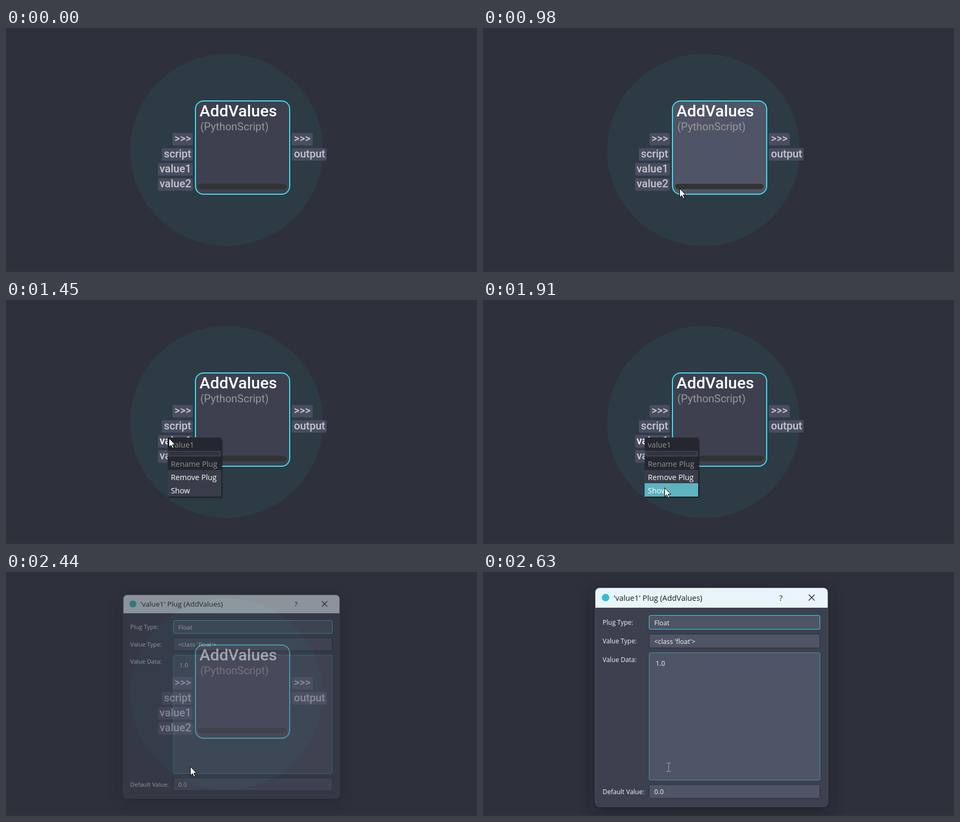
Recreate the animation shown at these times as an HTML page. Size 880 by 458 pixels, loop 3.9 s.

```html
<!DOCTYPE html>
<html lang="en">
<head>
<meta charset="utf-8">
<title>Plug menu</title>
<style>
  html, body { margin: 0; width: 100%; height: 100%; overflow: hidden; background: #2e313c; }
  svg { display: block; width: 100vw; height: 100vh; }
  .node text { font-family: Roboto, sans-serif; font-size: 20px; }
  .plug rect { fill: #4a4d60; }
  .plug text { fill: #c6c7cc; font-weight: 500; }
  .plug.lit rect { fill: #595e75; }
  .plug.lit text, .plug.open text { fill: #fff; }
  .menu text { font: 14.2px "Open Sans", "Noto Sans", sans-serif; fill: #fff; }
  .menu .off { fill: #929295; }
  .dialog text { font: 12px "Open Sans", "Noto Sans", sans-serif; fill: #f4f5f7; }
  .dialog .value { font-size: 12.4px; }
  .dialog .title { font-size: 14.4px; fill: #1b1b1d; }
  .field { fill: #4f5466; stroke: #2a2c35; }
</style>
</head>
<body>
<svg viewBox="0 0 880 458" preserveAspectRatio="none">
  <defs>
    <linearGradient id="bar"><stop offset="0" stop-color="#e8f5fb"/><stop offset=".4" stop-color="#e8f5f6"/><stop offset="1" stop-color="#eaf4fd"/></linearGradient>
    <filter id="soft" x="-20%" y="-20%" width="140%" height="140%"><feGaussianBlur stdDeviation="14"/></filter>
    <filter id="tight"><feGaussianBlur stdDeviation="1"/></filter>
  </defs>
  <rect width="880" height="458" fill="#2e313c"/>
  <circle cx="412" cy="229" r="180" fill="#2d3b45"/>
  <rect y="457" width="880" height="1" fill="#36343e"/>

  <g class="node">
    <rect id="body" x="354" y="137" width="176" height="175" rx="15" stroke="#3be3f0" stroke-width="2"/>
    <rect x="359" y="292.5" width="165" height="10" rx="5" fill="#333"/>
    <text x="361.5" y="166" fill="#fff" style="font-size:30px;font-weight:500">AddValues</text>
    <text x="363" y="192" fill="#989898">(PythonScript)</text>
    <g id="plugs"></g>
  </g>

  <g class="menu" id="menu">
    <rect x="304" y="262" width="100" height="109" fill="#15161b" opacity=".8" filter="url(#tight)"/>
    <rect x="302" y="258" width="100" height="111" fill="#393d4a"/>
    <rect x="302" y="258" width="100" height="25" fill="#25272f"/>
    <rect x="306" y="286" width="92" height="1" fill="#22242b"/>
    <rect x="306" y="289" width="92" height="1" fill="#22242b"/>
    <rect x="302" y="294" width="100" height="25" fill="#25272f"/>
    <rect id="pick" x="302" width="100" height="25" fill="#5fb4bf"/>
    <text class="off" x="308" y="277">value1</text>
    <text class="off" x="308" y="313">Rename Plug</text>
    <text x="308" y="338">Remove Plug</text>
    <text x="308" y="363">Show</text>
  </g>

  <g class="dialog" id="dialog">
    <rect x="208" y="38" width="438" height="412" rx="10" fill="#14151a" opacity=".55" filter="url(#soft)"/>
    <rect x="209.5" y="29.5" width="435" height="411" rx="8" fill="#3d404f" stroke="#4a4d59"/>
    <path d="M210 67V38a8 8 0 0 1 8-8H636a8 8 0 0 1 8 8V67Z" fill="url(#bar)"/>
    <circle cx="229" cy="48" r="7" fill="#31bfd0"/>
    <text class="title" x="244" y="53.5">'value1' Plug (AddValues)</text>
    <text class="title" x="553.5" y="53.5">?</text>
    <path d="M608.5 42.5l11 11m0-11l-11 11" stroke="#1b1b1d" stroke-width="1.3"/>
    <g id="fields"></g>
  </g>

  <path id="arrow" d="M.5.5V17L4.4 13.4 7 19.3 9.6 18.2 7 12.5H12Z" fill="#fff" stroke="#000"/>
  <path id="beam" d="M343 358.500h3l1 1 1-1h3M347 359v15M343 374.500h3l1-1 1 1h3" fill="none" stroke="#b3aaa0"/>
</svg>
<script>
const $ = id => document.getElementById(id);
const NS = "http://www.w3.org/2000/svg";
const LOOP = 3900;

function add(parent, tag, attrs, text) {
  const el = document.createElementNS(NS, tag);
  for (const k in attrs) el.setAttribute(k, attrs[k]);
  if (text) el.textContent = text;
  return parent.appendChild(el);
}

// label, left, top, width, right aligned
const plugs = [
  [">>>", 311, 197, 38, true], ["script", 291, 225.5, 58, true],
  ["value1", 284, 253.5, 65, true], ["value2", 284, 282, 65, true],
  [">>>", 534, 197, 39, false], ["output", 534, 225.5, 65, false]
].map(([label, x, y, width, right]) => {
  const g = add($("plugs"), "g", { class: "plug" });
  add(g, "rect", { x, y, width, height: 23.5, rx: 3 });
  add(g, "text", { x: right ? x + width - 3 : x + 4, y: y + 17,
    "text-anchor": right ? "end" : "start" }, label);
  return g;
});

// label, value, top, height, border
[
  ["Plug Type:", "Float", 81.5, 26, "#30dce9"],
  ["Value Type:", "<class 'float'>", 116.5, 26],
  ["Value Data:", "1.0", 151.5, 239, "#3f9ba5"],
  ["Default Value:", "0.0", 399, 26]
].forEach(([label, value, y, height, border]) => {
  const g = $("fields"), tall = height > 30;
  const box = add(g, "rect", { class: "field", x: 310.5, y, width: 319, height, rx: 2.5 });
  if (border) box.style.stroke = border;
  add(g, "text", { x: 223.5, y: y + 17.5 }, label);
  add(g, "text", { class: "value", x: tall ? 322.5 : 320, y: y + (tall ? 24.5 : 18) }, value);
});

// time, x, y
const path = [
  [660, 788, 444], [720, 722, 422], [790, 622, 388], [850, 512, 351], [920, 422, 320],
  [980, 367, 301], [1050, 324, 270], [1110, 298, 251], [1180, 290, 245], [1310, 305, 254],
  [1450, 304, 259], [1640, 306, 266], [1700, 311, 282], [1770, 319, 305], [1840, 329, 330],
  [1900, 339, 352], [1970, 344, 364], [2300, 344, 365]
];
// time, scale, opacity
const opening = [[2440, .93, .5], [2500, .976, .98], [2570, .994, 1], [2630, 1, 1]];

const at = (table, t) => table.filter(row => row[0] <= t).pop();
const show = (el, on) => el.setAttribute("visibility", on ? "visible" : "hidden");

function draw(t) {
  const spot = at(path, t), grow = at(opening, t);
  const menuOn = t >= 1450 && t < 2440;

  $("body").setAttribute("fill", t >= 980 && t < 1450 ? "#4f5466" : "#3d404f");
  plugs[2].classList.toggle("lit", t >= 1110 && t < 1450);
  plugs[2].classList.toggle("open", menuOn);

  show($("menu"), menuOn);
  const y = spot ? spot[2] : 0;
  show($("pick"), menuOn && y >= 319);
  $("pick").setAttribute("y", y >= 344 ? 344 : 319);

  show($("dialog"), grow);
  if (grow) {
    $("dialog").setAttribute("transform", `translate(345 218) scale(${grow[1]}) translate(-345 -218)`);
    $("dialog").setAttribute("opacity", grow[2]);
  }

  show($("arrow"), spot && t < 2500);
  show($("beam"), t >= 2500);
  if (spot) $("arrow").setAttribute("transform", `translate(${spot[1]} ${y})`);
}

const start = performance.now();
function tick() {
  draw((performance.now() - start) % LOOP);
  requestAnimationFrame(tick);
}
tick();
</script>
</body>
</html>
```
